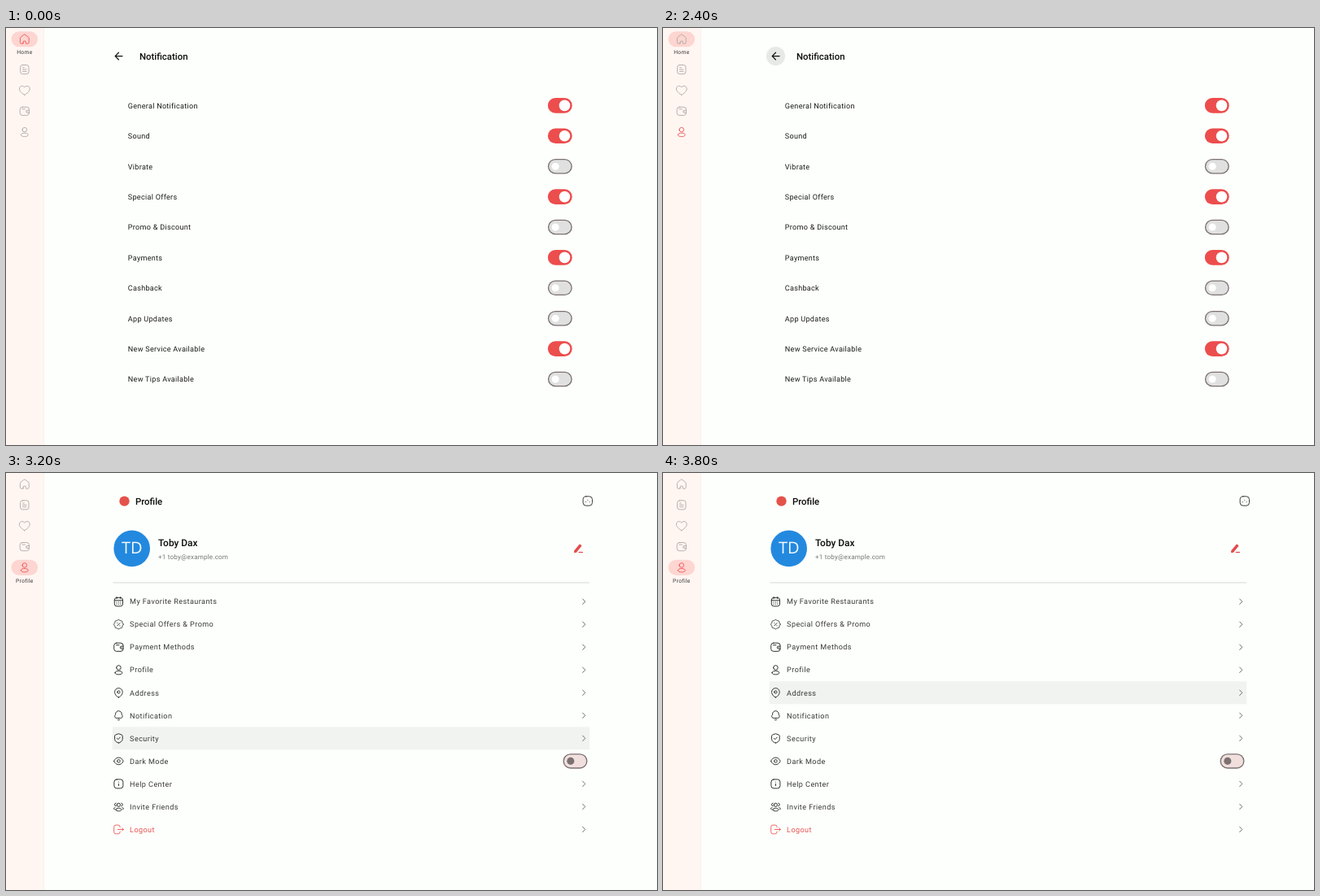
Recreate the animation shown at these times as an HTML page with a canvas. Size 800x513 px, loop 5.1 s.

```html
<!DOCTYPE html>
<html lang="en">
<head>
<meta charset="utf-8">
<title>Settings screens</title>
<style>
html, body { margin: 0; width: 100%; height: 100%; overflow: hidden; background: #fdfffc; }
canvas { display: block; width: 800px; height: 513px; }
</style>
</head>
<body>
<canvas id="stage" width="800" height="513"></canvas>
<script>
const ctx = document.getElementById('stage').getContext('2d');
const LOOP = 5100;
const UNIT = 0.5675; // pixels per layout unit
const RED = '#ec4d4d', INK = '#2b2b2b', GREY = '#aaa4a2', BORDER = '#7b7170';

const circlePath = (x, y, r) => `M${x - r} ${y}a${r} ${r} 0 1 0 ${2 * r} 0a${r} ${r} 0 1 0 ${-2 * r} 0z`;
const boxPath = (x, y, w, h, r) =>
  `M${x + r} ${y}h${w - 2 * r}a${r} ${r} 0 0 1 ${r} ${r}v${h - 2 * r}a${r} ${r} 0 0 1 ${-r} ${r}` +
  `h${2 * r - w}a${r} ${r} 0 0 1 ${-r} ${-r}v${2 * r - h}a${r} ${r} 0 0 1 ${r} ${-r}z`;

function badgePath() {
  let d = '';
  for (let i = 0; i < 96; i++) {
    const a = i / 96 * 2 * Math.PI, r = 9.5 + 0.65 * Math.cos(8 * a);
    d += `${i ? 'L' : 'M'}${12 + r * Math.cos(a)} ${12 + r * Math.sin(a)}`;
  }
  return d + 'z';
}

const WALLET = boxPath(2, 3, 20, 18, 5.4) + 'M22 15.4h-4a2.7 2.7 0 0 1 0-5.4h4M18 12.7h.4M7 7.5h6';
const USER = circlePath(12, 7, 4.9) + 'M4.2 18c0-2.8 4-3.8 7.8-3.8s7.8 1 7.8 3.8-4 3.9-7.8 3.9-7.8-1.1-7.8-3.9z';
const shapes = {
  home: 'M9.1 20.8v-3.1a1.4 1.4 0 0 1 1.4-1.4h2.9a1.4 1.4 0 0 1 1.4 1.4v3.1a1.2 1.2 0 0 0 1.2 1.2h2a3.5 3.5 0 0 0 3.5-3.5V9.9a2.5 2.5 0 0 0-1-1.9l-6.5-5.3a3.2 3.2 0 0 0-4 0L3.5 8a2.5 2.5 0 0 0-1 1.9v8.6A3.5 3.5 0 0 0 6 22h1.9a1.2 1.2 0 0 0 1.2-1.2z',
  orders: boxPath(2.8, 2.2, 18.4, 19.6, 5) + 'M8 16.2h8M8 12h8M8 7.9h3.2',
  heart: 'M12 22C7 19 1 14.500 0.700 9 0.500 5 3.300 2.500 6.600 2.500c2.300 0 4.300 1.100 5.400 3 1.100-1.900 3.100-3 5.400-3 3.300 0 6.100 2.500 5.900 6.500C23 14.500 17 19 12 22z',
  wallet: WALLET,
  user: USER,
  calendar: boxPath(3, 3.5, 18, 18.5, 5) + 'M3 9.4h18M8 2v3.500M16 2v3.500M7.500 13.300h.5M11.800 13.300h.5M16 13.300h.5M7.500 17.300h.5M11.800 17.300h.5M16 17.300h.5',
  badge: badgePath() + 'M9.2 14.800l5.600-5.600M9.200 9.200h.3M14.500 14.800h.3',
  pin: 'M12 22c-2.800 0-8.500-6-8.500-11.500a8.500 8.500 0 0 1 17 0C20.500 16 14.800 22 12 22z' + circlePath(12, 10.500, 2.900),
  bell: 'M12 17.8c5.6 0 8.2-.7 8.4-3.6 0-2.9-1.8-2.7-1.8-6.2 0-2.8-2.600-5.900-6.600-5.900S5.400 5.200 5.400 8c0 3.500-1.800 3.300-1.800 6.200.2 2.900 2.800 3.600 8.400 3.600zM9.600 20.900c1.400 1.500 3.500 1.500 4.800 0',
  shield: 'M12 22c-2 0-8.500-3-8.500-8V6.500c0-1 .5-1.500 1.500-1.800l6-2.400a3 3 0 0 1 2 0l6 2.400c1 .3 1.500.8 1.500 1.800V14c0 5-6.500 8-8.500 8zM8.500 12l2.400 2.400 4.200-4.500',
  eye: 'M1.800 12c2-5 6-7.700 10.200-7.700S20.200 7 22.200 12c-2 5-6 7.700-10.200 7.700S3.800 17 1.800 12z' + circlePath(12, 12, 3.200),
  info: boxPath(2.300, 2.300, 19.400, 19.400, 5.600) + 'M12 16v-4M12 8v.2',
  people: circlePath(12, 8.200, 3.700) + 'M6 18.500c0-2.500 3-3.300 6-3.300s6 .8 6 3.300-3 3.100-6 3.100-6-.6-6-3.100zM17.800 10.800a3.300 3.300 0 0 0 0-6.500M6.200 10.800a3.300 3.300 0 0 1 0-6.500M19.800 14c1.600.3 2.700 1 2.700 2.200 0 .9-.6 1.500-1.700 1.800M4.200 14c-1.600.3-2.700 1-2.700 2.200 0 .9.600 1.500 1.700 1.800',
  logout: 'M15 7.400v-.9a4 4 0 0 0-4-4H6a4 4 0 0 0-4 4v11a4 4 0 0 0 4 4h5a4 4 0 0 0 4-4v-.9M22.500 12H9.800M19.500 9l3 3-3 3',
  more: boxPath(2, 2, 20, 20, 6.500) + 'M8 14h.2M12 10h.2M16 14h.2',
  back: 'M20 12H4.500M12 4.300L4.300 12l7.700 7.700',
  chevron: 'M9.300 6.300L14.800 12l-5.500 5.700'
};
const icons = {};
for (const name in shapes) icons[name] = new Path2D(shapes[name]);

function icon(name, x, y, color, weight = 1.6) {
  ctx.save();
  ctx.translate(x, y);
  ctx.scale(UNIT, UNIT);
  ctx.translate(-12, -12);
  ctx.strokeStyle = color;
  ctx.lineWidth = weight;
  ctx.lineCap = ctx.lineJoin = 'round';
  ctx.stroke(icons[name]);
  ctx.restore();
}

function text(str, x, y, size, color, { weight = 400, gap = 0, align = 'left', family = 'Roboto' } = {}) {
  ctx.font = `${weight} ${size}px ${family}, sans-serif`;
  ctx.letterSpacing = gap + 'px';
  ctx.textRendering = 'geometricPrecision';
  ctx.textAlign = align;
  ctx.fillStyle = color;
  ctx.fillText(str, x, y);
}

function rect(x, y, w, h, color) {
  ctx.fillStyle = color;
  ctx.fillRect(x, y, w, h);
}

function disc(x, y, r, color) {
  ctx.beginPath();
  ctx.arc(x, y, r, 0, 2 * Math.PI);
  ctx.fillStyle = color;
  ctx.fill();
}

function pill(cx, cy, w, h, color) {
  ctx.beginPath();
  ctx.roundRect(cx - w / 2, cy - h / 2, w, h, h / 2);
  ctx.fillStyle = color;
  ctx.fill();
}

function toggle(cx, cy, on, track = '#e0e0e0', thumb = '#fff') {
  const w = 52 * UNIT, h = 32 * UNIT, edge = 2 * UNIT;
  pill(cx, cy, w + 0.4, h + 0.4, on ? RED : BORDER);
  if (!on) pill(cx, cy, w - 2 * edge, h - 2 * edge, track);
  disc(cx + (on ? 10 : -10) * UNIT, cy, (on ? 12 : 8) * UNIT, thumb);
}

const NAV = ['home', 'orders', 'heart', 'wallet', 'user'];

function sidebar(open, active) {
  rect(0, 0, 47, 513, '#fff6f2');
  rect(46, 0, 1, 513, '#f7f1ee');
  NAV.forEach((name, i) => {
    const y = 13.7 + 25.65 * i + (i > open ? 11.7 : 0);
    if (i === open) {
      pill(22.8, y, 32.5, 19, '#fdd5d1');
      text(open ? 'Profile' : 'Home', 22.9, y + 18.4, 6.8, '#3c3a39', { gap: 0.28, align: 'center' });
    }
    icon(name, 22.8, y, i === active ? RED : GREY, 1.5);
  });
}

const SETTINGS = [
  ['General Notification', 1], ['Sound', 1], ['Vibrate', 0], ['Special Offers', 1],
  ['Promo & Discount', 0], ['Payments', 1], ['Cashback', 0], ['App Updates', 0],
  ['New Service Available', 1], ['New Tips Available', 0]
];

function settingsPage(hover) {
  disc(138.5, 34.6, 11.6, `rgba(0,0,0,${0.085 * hover})`);
  icon('back', 138.5, 34.6, '#111', 2.1);
  text('Notification', 163.9, 39.1, 11.4, '#0c0c0c', { weight: 500 });
  SETTINGS.forEach(([label, on], i) => {
    const y = 95.4 + 37.4 * i;
    text(label, 149.8, y + 3.4, 9.08, '#1c1c1c', { gap: 0.28 });
    toggle(680.8, y, on);
  });
}

const MENU = [
  ['My Favorite Restaurants', 'calendar'], ['Special Offers & Promo', 'badge'],
  ['Payment Methods', 'wallet'], ['Profile', 'user'], ['Address', 'pin'],
  ['Notification', 'bell'], ['Security', 'shield'], ['Dark Mode', 'eye'],
  ['Help Center', 'info'], ['Invite Friends', 'people'], ['Logout', 'logout']
];

function pencil(x, y) {
  ctx.save();
  ctx.translate(x, y);
  ctx.fillStyle = '#e24c4c';
  ctx.fill(new Path2D('M-5.2 2.400L1 -5Q1.700 -5.700 2.500 -5.100L3.700 -4.100Q4.300 -3.500 3.700 -2.700L-2.200 4.500Q-2.500 4.900 -3.100 5L-5 5.100Q-5.400 5 -5.400 4.500z'));
  ctx.fillRect(0.3, 3.9, 5.2, 1.3);
  ctx.restore();
}

function profilePage(hoverRow) {
  disc(145.5, 34.6, 6.2, '#e5524a');
  text('Profile', 159, 39.1, 11.4, '#0c0c0c', { weight: 500 });
  icon('more', 714.8, 34.5, '#333', 1.7);

  disc(154.7, 92.9, 22.3, '#2389df');
  text('TD', 154.7, 98.900, 20, '#f4f9fe', { align: 'center', family: '"Open Sans"' });
  text('Toby Dax', 187.1, 90.1, 11.9, '#0c0c0c', { weight: 500 });
  text('+1 toby@example.com', 187.1, 105.8, 8.1, '#777', { gap: 0.18 });
  pencil(703.4, 93);
  rect(131.5, 134.300, 585.500, 1.2, '#dcdedb');

  MENU.forEach(([label, name], i) => {
    const y = 158.2 + 28.03 * i, last = name === 'logout';
    if (i === hoverRow) rect(130.7, y - 14, 586.500, 28, '#f1f3f1');
    icon(name, 138.4, y, last ? RED : INK, last ? 1.5 : 1.7);
    text(label, 152.1, y + 3.2, 9.08, last ? '#e54f4f' : '#383838', { gap: 0.42 });
    if (name === 'eye') toggle(699.5, y, false, '#f0dfdd', BORDER);
    else icon('chevron', 710.2, y, '#666', 1.7);
  });
}

// Row under the pointer on the profile page
function hoveredRow(t) {
  if (t < 3100) return -1;
  if (t < 3600) return 6;
  return t < 3800 ? 5 : 4;
}

function draw(t) {
  rect(0, 0, 800, 513, '#fdfffc');
  if (t < 2500) {
    sidebar(0, t < 2400 ? 0 : 4);
    settingsPage(t < 100 ? 0 : t < 200 ? 0.6 : 1);
  } else {
    sidebar(4, 4);
    profilePage(hoveredRow(t));
  }
}

const start = performance.now();
function tick() {
  draw((performance.now() - start) % LOOP);
  requestAnimationFrame(tick);
}
tick();
</script>
</body>
</html>
```
